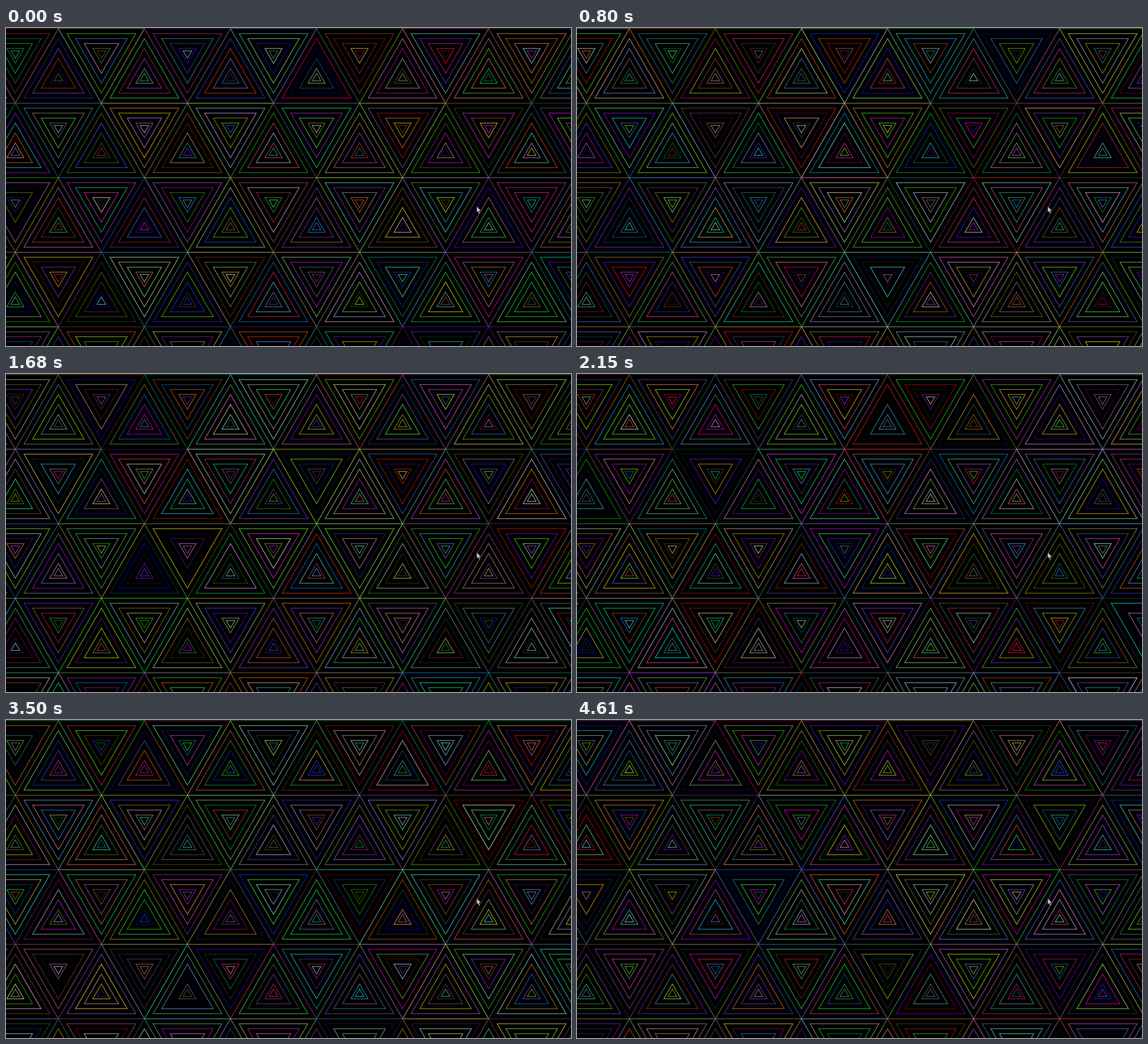
An HTML page with a canvas for the animation above (4.95 s loop, 998 by 561 pixels).

```html
<!DOCTYPE html>
<html lang="en">
<head>
<meta charset="utf-8">
<title>Nested triangles</title>
<style>
  html, body { margin: 0; width: 100%; height: 100%; overflow: hidden; background: #000; }
  canvas { display: block; width: 998px; height: 561px; }
</style>
</head>
<body>
<canvas id="stage" width="998" height="561"></canvas>
<script>
const ctx = document.getElementById('stage').getContext('2d');
const LOOP = 4950;
const STARTS = [0, 170, 800, 1280, 1680, 2150, 2700, 3100, 3500, 4160, 4610];
const SCALES = [1, 0.8, 0.6, 0.4, 0.2, 0.1];
const SIDE = 152, HEIGHT = 131.5, LEFT = 16.5, TOP = 1;

function makeRandom(seed) {
  let s = seed;
  return () => {
    s = (s + 0x6D2B79F5) | 0;
    let t = Math.imul(s ^ (s >>> 15), 1 | s);
    t = (t + Math.imul(t ^ (t >>> 7), 61 | t)) ^ t;
    return ((t ^ (t >>> 14)) >>> 0) / 4294967296;
  };
}

function triangle(x, y, dir, scale, color) {
  const half = SIDE / 2 * scale;
  const base = y - dir * HEIGHT / 3 * scale;
  ctx.strokeStyle = color;
  ctx.beginPath();
  ctx.moveTo(x - half, base);
  ctx.lineTo(x + half, base);
  ctx.lineTo(x, y + dir * HEIGHT * 2 / 3 * scale);
  ctx.closePath();
  ctx.stroke();
}

function cursor(x, y) {
  ctx.globalAlpha = 1;
  ctx.beginPath();
  [[0, 0], [0, 11], [2.4, 9], [4.2, 13], [6, 12.2], [4.3, 8.3], [7.5, 8]]
    .forEach(([dx, dy]) => ctx.lineTo(x + dx, y + dy));
  ctx.closePath();
  ctx.fillStyle = '#c4c4c8';
  ctx.fill();
  ctx.strokeStyle = '#222';
  ctx.lineWidth = 0.7;
  ctx.stroke();
}

function paint(index) {
  const rand = makeRandom(index * 7919 + 41);
  const channel = () => Math.floor(rand() * 230);
  ctx.globalAlpha = 1;
  ctx.fillStyle = '#000';
  ctx.fillRect(0, 0, 998, 561);
  ctx.lineWidth = 1.25;
  for (let row = 0; row < 5; row++) {
    for (let col = -1; col < 14; col++) {
      const down = (row + col) % 2 === 0;
      const x = LEFT + col * SIDE / 2;
      const y = TOP + HEIGHT * (row + (down ? 1 : 2) / 3);
      SCALES.forEach((scale, ring) => {
        // Outer edges are shared by two triangles, so each adds less light
        ctx.globalAlpha = ring ? 0.72 : 0.5;
        triangle(x, y, down ? 1 : -1, scale, `rgb(${channel()},${channel()},${channel()})`);
      });
    }
  }
  cursor(831.5, 314.5);
}

let shown = 0;
paint(shown);
const begin = performance.now();

function tick() {
  const t = (performance.now() - begin) % LOOP;
  const index = STARTS.findLastIndex(start => start <= t);
  if (index !== shown) paint(shown = index);
  requestAnimationFrame(tick);
}
requestAnimationFrame(tick);
</script>
</body>
</html>
```
